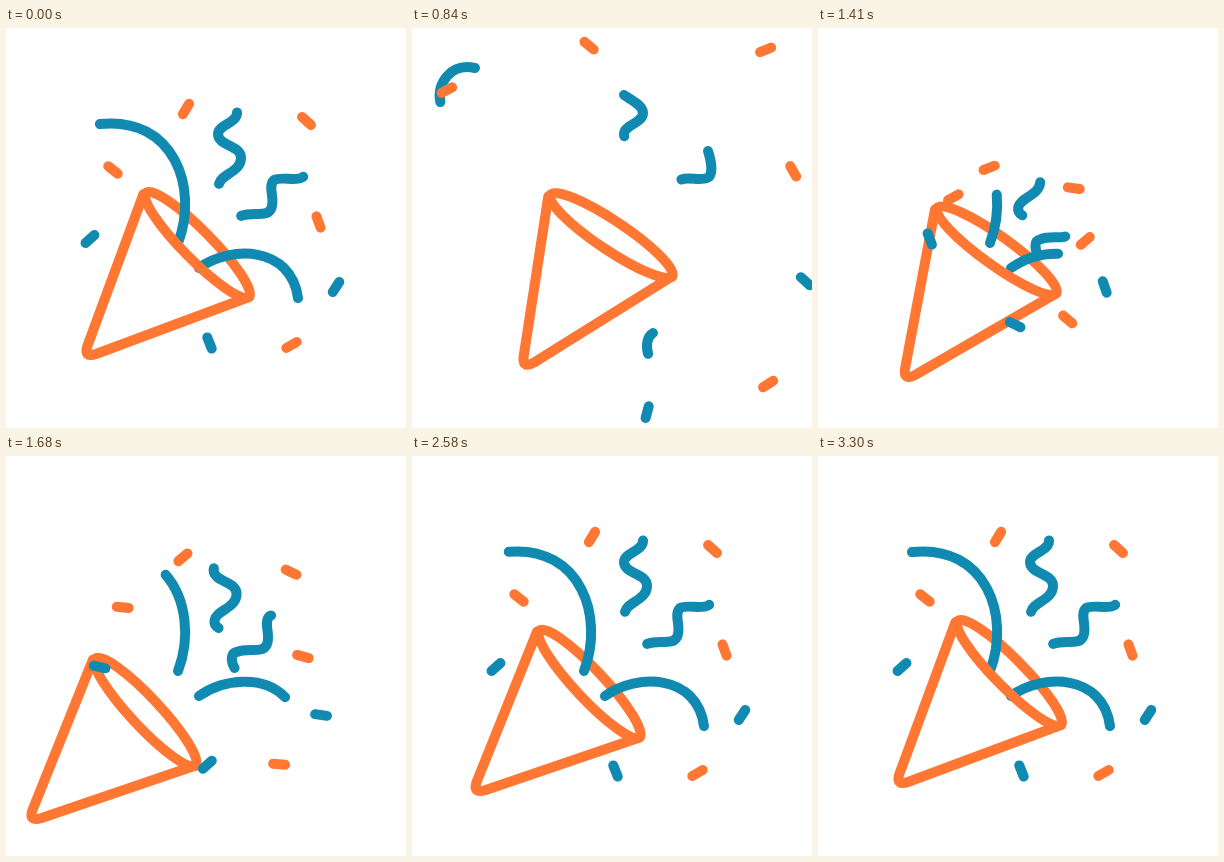
These frames come from a looping animation (400x400 px, 3830 ms). An HTML page:

```html
<!DOCTYPE html>
<html lang="en">
<head>
<meta charset="utf-8">
<title>Party popper</title>
<style>
  html, body { margin: 0; width: 100%; height: 100%; overflow: hidden; background: #fff; }
  svg { display: block; width: 100%; height: 100%; fill: none; stroke-width: 10; stroke-linecap: round; stroke-linejoin: round; }
  .orange { stroke: #ff7733; }
  .blue { stroke: #118ab2; }
</style>
</head>
<body>
<svg viewBox="0 0 400 400">
  <path class="cone orange" d="M140 165A73 14.5 45.3 0 1 243 269"/>
  <g id="streamers"></g>
  <path class="cone orange" d="M140 165A73 14.5 45.3 0 0 243 269L90 326Q78 330 81 319L137.500 166"/>
  <g id="confetti"></g>
</svg>
<script>
const LOOP = 3830, BURST = 1215;
const $ = id => document.getElementById(id);
const clamp = v => Math.min(1, Math.max(0, v));
const span = (t, from, to) => clamp((t - from) / (to - from));
const mix = (a, b, p) => a + (b - a) * p;
const remaining = (u, power) => (1 - u) ** power;
const show = (el, on) => el.setAttribute('visibility', on ? 'visible' : 'hidden');

function addPath(parent, d, color) {
  const el = document.createElementNS('http://www.w3.org/2000/svg', 'path');
  el.setAttribute('d', d);
  el.setAttribute('class', color);
  parent.append(el);
  return el;
}

// Cone: time, apex x, apex y, rotation
const coneKeys = [
  [30, 83, 327, 0], [840, 115, 337, -11.5], [1230, 119, 342, -14.5], [1680, 28, 363, 1.6],
  [2190, 42, 347, 4], [2580, 66, 335, 1.6], [3300, 83, 327, 0]
];
const cones = document.querySelectorAll('.cone');

function slope(i, c) {
  const a = coneKeys[i - 1], b = coneKeys[i + 1];
  return a && b && i !== 2 ? (b[c] - a[c]) / (b[0] - a[0]) : 0;
}

function conePose(t) {
  let i = 0;
  while (i < coneKeys.length - 2 && t > coneKeys[i + 1][0]) i++;
  const a = coneKeys[i], b = coneKeys[i + 1], d = b[0] - a[0], s = span(t, a[0], b[0]);
  return [1, 2, 3].map(c => mix(a[c], b[c], s * s * (3 - 2 * s)) +
    d * s * (1 - s) * ((1 - s) * slope(i, c) - s * slope(i + 1, c)));
}

// Streamers: a visible window slides along each path (lead-in, body, lead-out)
const streamers = [
  { lead: 'M172 215', body: 'C193 160 168 88 94 96', tail: 'C68 101 36 106 30 80C22 60 36 34 63 40',
    gone: 930, grow: 1820, power: 3, drift: 0 },
  { lead: 'M193 240', body: 'C225 217 285 218 292 270', tail: 'C296 310 275 338 252 340C236 341 229 312 241 305',
    gone: 880, grow: 1600, power: 4, drift: 0 },
  { lead: 'M217 164Q212 161 213 156', body: 'C215 146 235 144 235 130C235 117 212 118 212 106C212 97 231 95 231 85',
    tail: 'C231 77 219 72 212 67', gone: 1140, grow: 1600, power: 4, drift: 1 },
  { lead: 'M233 204C229 197 229 189 235 188', body: 'C247 183 260 190 265 181C270 171 261 159 268 152C276 148 290 154 297 149',
    tail: 'C301 144 299 132 296 123', gone: 1140, grow: 1600, power: 4, drift: 1 }
].map(s => {
  const el = addPath($('streamers'), s.lead, 'blue');
  const length = d => { el.setAttribute('d', d); return el.getTotalLength(); };
  return { ...s, el, start: length(s.lead), end: length(s.lead + s.body), total: length(s.lead + s.body + s.tail) };
});

function drawStreamer(s, t) {
  let from, to, offset = 0;
  if (t < BURST) {
    from = mix(s.start, s.total, span(t, 30, s.gone) ** 2);
    to = mix(s.end, s.total, span(t, 30, 740) ** 1.5);
  } else {
    from = s.start * span(t, 1680, 2080);
    to = s.end * (1 - remaining(span(t, 1220, 1220 + s.grow), s.power));
    offset = s.drift * remaining(span(t, BURST, 2315), 3);
  }
  show(s.el, to - from > .1 && (t < BURST || t > 1240));
  s.el.setAttribute('stroke-dasharray', `${Math.max(.1, to - from)} 2000`);
  s.el.setAttribute('stroke-dashoffset', -from);
  s.el.setAttribute('transform', `translate(${-23 * offset} ${42 * offset})`);
}

// Confetti: rest, birth and exit are [x, y, angle]; birth angle is relative to rest
const confetti = [
  { rest: [180, 81, -59], birth: [164, 187, 60], exit: [177, 16, -140], last: -220, hide: 1290 },
  { rest: [300.5, 93, 42], birth: [220, 214, -54], exit: [355, 20, -22], last: -60, hide: 1290 },
  { rest: [107, 142, 38], birth: [158, 191, -105], exit: [33, 60, -28], last: -60, hide: 1170 },
  { rest: [312.500, 194, 70], birth: [231, 228, -175], exit: [383, 142, 60], last: 55, hide: 1050 },
  { rest: [285.500, 317, -30], birth: [221, 271, 111], exit: [358, 357, -33], last: -35, hide: 1170, late: true },
  { rest: [84, 211, -42], birth: [134, 211, 175], exit: [-14, 205, -100], last: -130, hide: 800, late: true },
  { rest: [330, 259, 123], birth: [252, 259, -366], exit: [395, 253, 42], last: 0, hide: 1050, late: true },
  { rest: [203.500, 315, 68], birth: [192, 282, -350], exit: [236, 386, 105], last: 125, hide: 1170, late: true }
].map((c, i) => {
  const make = () => addPath($('confetti'), 'M-6 0H6', i < 5 ? 'orange' : 'blue');
  return { ...c, leaving: make(), arriving: make() };
});

function place(el, x, y, angle) {
  el.setAttribute('transform', `translate(${x} ${y}) rotate(${angle})`);
}

function drawConfetti(c, t) {
  const [x, y, angle] = c.rest;
  const out = 1 - remaining(span(t, 30, 1180), 3);
  const turn = mix(mix(angle, c.exit[2], span(t, 30, 840)), c.last, span(t, 840, 1230));
  place(c.leaving, mix(x, c.exit[0], out), mix(y, c.exit[1], out), turn);
  show(c.leaving, t < c.hide);

  const left = remaining(span(t, BURST, 2315), 3);
  const spin = c.birth[2] * remaining(span(t, 1200, 2700), 3);
  place(c.arriving, mix(x, c.birth[0], left), mix(y, c.birth[1], left), angle + spin);
  show(c.arriving, t > (c.late ? 1240 : BURST));
}

function draw(now) {
  const t = now % LOOP;
  const [x, y, angle] = conePose(t);
  cones.forEach(el => el.setAttribute('transform', `translate(${x - 83} ${y - 327}) rotate(${angle} 83 327)`));
  streamers.forEach(s => drawStreamer(s, t));
  confetti.forEach(c => drawConfetti(c, t));
}

const began = performance.now();
function tick() {
  draw(performance.now() - began);
  requestAnimationFrame(tick);
}
tick();
</script>
</body>
</html>
```
